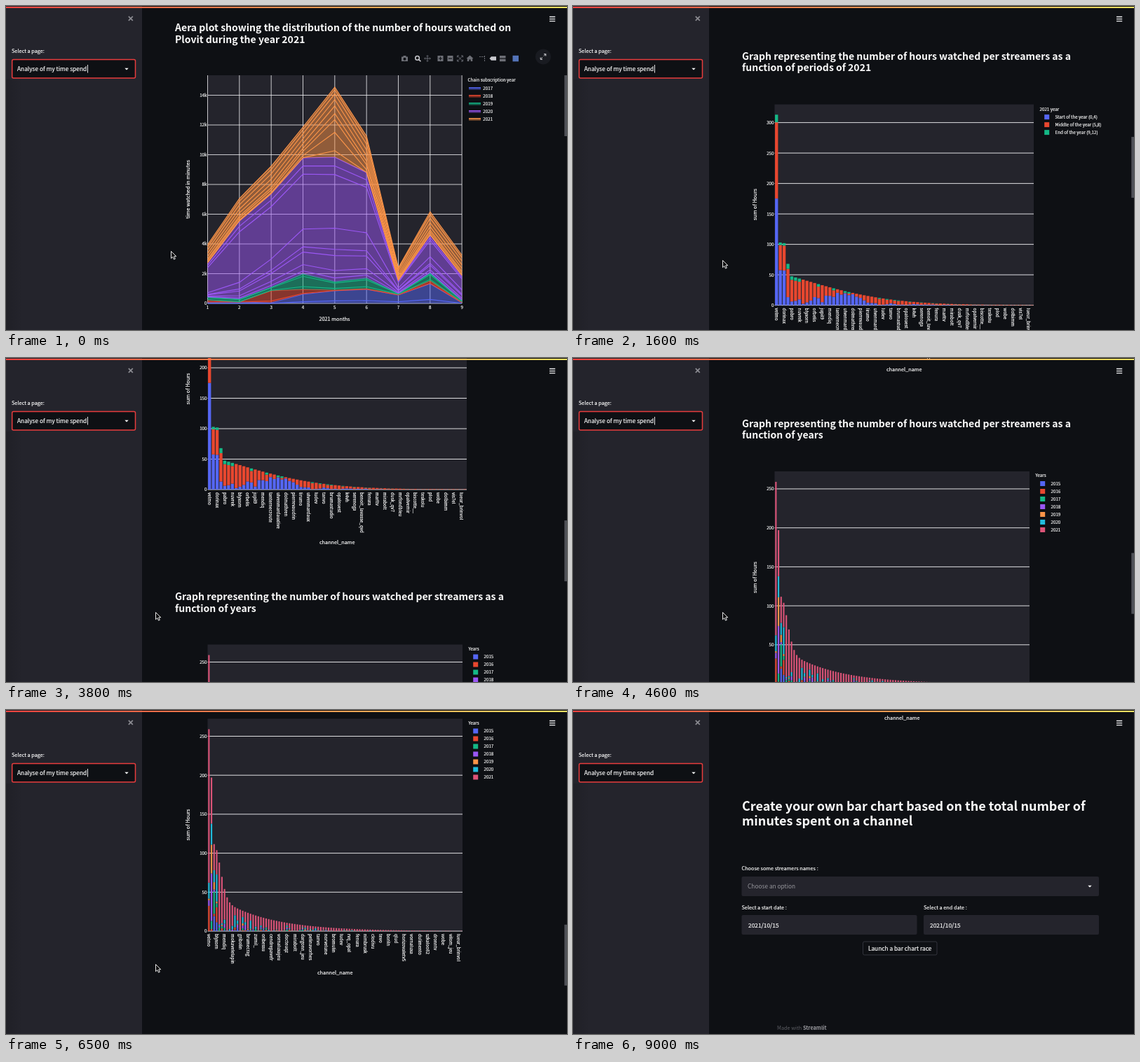
Animation, 800 px wide and 463 px high, one loop 9200 ms. Source, as an HTML page:

```html
<!DOCTYPE html>
<html lang="en">
<head>
<meta charset="utf-8">
<title>Time spent dashboard</title>
<style>
html, body { margin: 0; width: 100%; height: 100%; overflow: hidden; background: #0e1014; }
svg { display: block; width: 800px; height: 463px; font-family: "Noto Sans CJK JP", "Noto Sans CJK SC", "Noto Sans", sans-serif; }
text { fill: #fafafa; stroke: #fafafa; stroke-width: .18px; white-space: pre; }
.mid { text-anchor: middle; }
.end { text-anchor: end; }
.head { font-weight: 600; stroke: none; }
.hint { fill: #96969c; stroke: none; }
.foot { fill: #5d5e64; stroke: none; }
</style>
</head>
<body>
<svg id="stage" viewBox="0 0 800 463"></svg>
<script>
const PANEL = '#24242c', PAGE = '#0e1014';
const BLUE = '#5566f3', RED = '#e8472f', GREEN = '#14b886', PURPLE = '#9b57f5',
      ORANGE = '#fb9448', CYAN = '#20bcdc', PINK = '#dc5478';
const TINY = 6.22, SMALL = 7.3, BODY = 8.36, H3 = 14.02, H2 = 18.03;

const rect = (x, y, w, h, fill, more = '') =>
  `<rect x="${x}" y="${y}" width="${w}" height="${h}" fill="${fill}" ${more}/>`;
const path = (d, color, width = 1, more = '') =>
  `<path d="${d}" fill="none" stroke="${color}" stroke-width="${width}" ${more}/>`;
const text = (x, y, s, size, more = '') =>
  `<text x="${x}" y="${y}" font-size="${size}" ${more}>${s}</text>`;
const turned = (x, y, angle, s, size, more = '') =>
  text(0, 0, s, size, `transform="translate(${x} ${y}) rotate(${angle})" ${more}`);
const heading = (y, lines, size = H3, pitch = 16.5) =>
  lines.map((s, i) => text(241, y + i * pitch, s, size, 'class="head"')).join('');
const caretDown = (x, y) => `<path d="M${x - 2.7} ${y - 1.2}h5.4l-2.7 2.8z" fill="#fafafa"/>`;
const noise = n => { const v = Math.sin(n * 12.9898) * 43758.5453; return v - Math.floor(v); };
const gauss = (x, center, width) => Math.exp(-(((x - center) / width) ** 2));

// Stacked areas: top edge per month in pixels, and inner lines as shares of the band
const bands = [
  { color: BLUE, top: [2, 2, 1, 13, 18, 20, 12, 28, 1], inner: [.2] },
  { color: RED, top: [5, 2, 18, 20, 19, 21, 13, 32, 2], inner: [.2] },
  { color: GREEN, top: [9, 6, 23, 42, 31, 36, 14, 43, 4], inner: [.2, .85] },
  { color: PURPLE, top: [58, 118, 157, 208, 209, 187, 33, 98, 40], inner: [.03, .09, .21, .26, .43, .86, .93] },
  { color: ORANGE, top: [84, 150, 196, 252, 309, 239, 51, 131, 69], inner: [.005, .1, .25, .35, .5, .65, .8, .92] }
];

function innerShare(color, u, m) {
  if (color == ORANGE) return u ** (1.5 - 1.05 * gauss(m, 4, 1));
  return u < .5 ? u * Math.min(1, .3 + .2 * m) : u;
}

function areaChart() {
  const X = m => 287.5 + m * 45.33;
  const points = line => line.map((h, m) => `${X(m)} ${425 - h}`);
  let out = rect(287.5, 99, 362.6, 326, PANEL);
  let grid = '';
  for (let k = 0; k <= 14; k += 2) {
    const y = 425 - k * 21.25;
    grid += `M287.5 ${y}H650`;
    out += text(286.5, y + 2.4, k ? k + 'k' : 0, TINY, 'class="end"');
  }
  for (let m = 0; m < 9; m++) {
    grid += `M${X(m)} 99V425`;
    out += text(X(m), 432.8, m + 1, TINY, 'class="mid"');
  }
  out += path(grid, '#f4f4f6', .8) + text(658.5, 108, 'Chain subscription year', TINY);
  let base = Array(9).fill(0);
  bands.forEach(({ color, top, inner }, i) => {
    out += `<path d="M${points(top).join('L')}L${points(base).reverse().join('L')}z" fill="${color}" fill-opacity=".5"/>`;
    for (const u of [...inner, 1]) {
      const line = top.map((h, m) => base[m] + (h - base[m]) * innerShare(color, u, m));
      out += path('M' + points(line).join('L'), color, 1.15);
    }
    base = top;
    const y = 117.5 + i * 11;
    out += rect(660, y - 1.5, 17, 3.6, color, 'fill-opacity=".5"') + path(`M660 ${y - .7}h17`, color, 1.3)
      + text(680.3, y + 2.4, 2017 + i, TINY);
  });
  return out + turned(262, 262, -90, 'time watched in minutes', SMALL, 'class="mid"')
    + text(468.5, 449.6, '2021 months', SMALL, 'class="mid"');
}

function modebar() {
  const dim = '#6d6f76', lit = '#c9cacf';
  const box = x => rect(x - 4, 71, 8, 8, dim);
  return rect(564, 72.5, 9, 6.5, dim) + rect(566.5, 71, 4, 2, dim) + `<circle cx="568.5" cy="75.7" r="2" fill="${PAGE}"/>`
    + `<circle cx="586.6" cy="74.4" r="2.8" fill="none" stroke="${lit}" stroke-width="1.5"/>` + path('M588.8 76.6l2.6 2.6', lit, 1.6)
    + path('M601 70.8v8.4M596.8 75h8.4M599.6 72l1.4-1.4 1.4 1.4M599.6 78l1.4 1.4 1.4-1.4M598 73.6l-1.4 1.4 1.4 1.4M604 73.6l1.4 1.4-1.4 1.4', dim, .9)
    + box(619.5) + path('M619.5 72.5v5M617 75h5', PAGE, 1.2) + box(633.5) + path('M631 75h5', PAGE, 1.2)
    + path('M643.5 71l8 8M651.5 71l-8 8M643.5 73.5V71h2.5M649 71h2.5v2.5M643.5 76.5V79h2.5M649 79h2.5v-2.5', dim, .9)
    + `<path d="M661.5 70.5l5 4.6h-1.3V79h-2.5v-2.6h-2.4V79h-2.5v-3.9h-1.3z" fill="${dim}"/>`
    + path('M675 72.5h7M682.5 71v8', dim, 1, 'stroke-dasharray="2 1"')
    + `<path d="M689.5 75l2.5-2.7h7v5.4h-7z" fill="${lit}"/>`
    + rect(704, 71, 8.5, 3.5, dim) + rect(704, 75.7, 8.5, 3.5, dim) + rect(722.5, 70.8, 8.5, 8.5, '#5373b8')
    + '<circle cx="766" cy="72.5" r="11" fill="#191b21"/>'
    + path('M767 71.5l2.8-2.8M767 68.7h2.8v2.8M765 73.5l-2.8 2.8M762.2 73.5v2.8h2.8', '#d8d8dc');
}

function barChart(o) {
  const step = o.width / o.count;
  let out = rect(287.5, o.top, o.width, o.zero - o.top, PANEL);
  for (let v = 0; v <= o.max; v += 50) {
    const y = o.zero - v * o.scale;
    out += path(`M287.5 ${y}h${o.width}`, '#f4f4f6', .9) + text(286.5, y + 2.4, v, TINY, 'class="end"');
  }
  for (let i = 0; i < o.count; i++) {
    let y = o.zero;
    o.shares(i).forEach((share, k) => {
      const h = share * o.total(i) * o.scale;
      y -= h;
      out += rect(287.5 + (i + .5) * step - o.bar / 2, y, o.bar, h, o.keys[k][1]);
    });
  }
  o.names.forEach((s, i) => {
    out += turned(287.5 + (i * o.every + .5) * step - 2.2, o.zero + 4, 90, s, TINY);
  });
  out += text(o.legendX, o.legendY + 2.4, o.legend, TINY);
  o.keys.forEach(([label, color], i) => {
    const y = o.legendY + 11.5 + i * 11;
    out += rect(o.legendX + 6.7, y - 3.5, 7, 7, color) + text(o.legendX + 22, y + 2.4, label, TINY);
  });
  return out + turned(262, o.titleY, -90, 'sum of Hours', SMALL, 'class="mid"')
    + text(287.5 + o.width / 2, o.axisY, 'channel_name', SMALL, 'class="mid"');
}

const periodTotal = i => [313, 103, 102, 68][i] || .5 + 47 * Math.exp((4 - i) / 26) * gauss(i, 4, 32);
function periodShares(i) {
  const start = i < 3 ? .56 : .65 * gauss(i, 19, 5) + .35 * noise(i);
  const end = i < 3 ? .04 : noise(i + 90) > .65 ? .12 : 0;
  return [start, Math.max(0, 1 - start - end), end];
}

const yearTotal = i => [259, 197][i] || 34 * Math.exp((8 - i) / 19) + 65 * gauss(i, 2, 3.4);
function yearShares(i) {
  const last = i == 0 ? .76 : i < 4 ? .3 : 1 - .7 * noise(i) ** 2;
  const weights = Array.from({ length: 6 }, (_, k) => noise(i * 7 + k) ** 3 + (k == 5 ? .4 : 0));
  const sum = weights.reduce((a, b) => a + b);
  return [...weights.map(w => w / sum * (1 - last)), last];
}

const names = `velmo dorinax pabro nuvrek blyxorn orbelis jupil9 mendiq lanternecroute ulvenmardauxlive
  dolmathren pierrevaudrin lirumo ulvenmardaux ludev tanvo brumastudio opalouest k4vh serenoga benoit_lavasse_qvd
  fenura marltv mirabolt dusk_qv7 mrfondbleu opalvernir biscotte__ teskolu plod wobe dolbimm vis7el lueur_brinvol`.split(/\s+/);
const yearNames = `velmo blyxorn mendiq mokavelelapin gribolin brumecrag zurnil_ oribessu cendrepavefr vornaluxajeu
  docteuqz mirabolt dargonn_jeu pelinavorhes tanvo norvelune bromulin ludev rvq_opal fenura nimbrusk clodivu tevo
  boriln qlud horizovaletv5 vornaluxa dulimento szkaloo82 dronntv wobe vilom_jeu lueur_brinvol`.split(/\s+/);

function form() {
  const field = (x, y, w) => rect(x, y, w, 28, PANEL, 'rx="2"');
  return heading(143.5, ['Create your own bar chart based on the total number of', 'minutes spent on a channel'], H2, 21)
    + text(240.5, 229, 'Choose some streamers names :', SMALL) + field(240.5, 238, 509.5)
    + text(249, 255.3, 'Choose an option', BODY, 'class="hint"') + caretDown(737, 252)
    + text(240.5, 284.5, 'Select a start date :', SMALL) + text(500, 284.5, 'Select a end date :', SMALL)
    + field(240.5, 293, 250) + field(500, 293, 250)
    + text(250, 310.5, '2021/10/15', BODY) + text(509, 310.5, '2021/10/15', BODY)
    + rect(413.5, 331, 105.5, 19, PAGE, 'rx="2" stroke="#3d3e47" stroke-width=".8"')
    + text(466.2, 343.7, 'Launch a bar chart race', BODY, 'class="mid"')
    + text(291, 456.5, 'Made with <tspan font-weight="600" fill="#9b9ba0">Streamlit</tspan>', SMALL, 'class="foot"');
}

const page = heading(36, ['Aera plot showing the distribution of the number of hours watched on', 'Plovit during the year 2021'])
  + `<g id="tools">${modebar()}</g>` + areaChart()
  + heading(545.3, ['Graph representing the number of hours watched per streamers as a', 'function of periods of 2021'])
  + barChart({ count: 68, width: 369.5, bar: 4.35, top: 609, zero: 896, scale: .87, max: 300,
      total: periodTotal, shares: periodShares, names, every: 2,
      legendX: 665.5, legendY: 615.5, legend: '2021 year', titleY: 752, axisY: 974,
      keys: [['Start of the year (0,4)', BLUE], ['Middle of the year (5,8)', RED], ['End of the year (9,12)', GREEN]] })
  + heading(1054, ['Graph representing the number of hours watched per streamers as a', 'function of years'])
  + barChart({ count: 98, width: 363.5, bar: 2.1, top: 1117.5, zero: 1421, scale: 1.114, max: 250,
      total: yearTotal, shares: yearShares, names: yearNames, every: 3,
      legendX: 659.5, legendY: 1123.5, legend: 'Years', titleY: 1269, axisY: 1482.5,
      keys: [BLUE, RED, GREEN, PURPLE, ORANGE, CYAN, PINK].map((c, i) => [2015 + i, c]) })
  + `<g transform="translate(0 1468.5)">${form()}</g>`;

const sidebar = rect(0, 0, 194, 463, PANEL) + rect(0, 105, 24, 358, 'url(#shade)')
  + path('M174.8 14.8l6 6M180.8 14.8l-6 6', '#8b8b91', 1.7)
  + text(8, 67.3, 'Select a page:', SMALL)
  + rect(8.7, 76.5, 175.8, 26.6, PAGE, 'rx="2" stroke="#e73c3d" stroke-width="1.5"')
  + text(16, 93, 'Analyse of my time spend', BODY) + caretDown(172, 90)
  + rect(116, 84, .9, 11.5, '#fafafa', 'id="caret"');

document.getElementById('stage').innerHTML = `<defs>
  <linearGradient id="shade"><stop stop-color="#000" stop-opacity=".12"/><stop offset="1" stop-color="#000" stop-opacity="0"/></linearGradient>
  <linearGradient id="strip"><stop stop-color="#f8433f"/><stop offset="1" stop-color="#f6e463"/></linearGradient></defs>
  ${rect(0, 0, 800, 463, PAGE)}<g id="page">${page}</g>${sidebar}
  ${path('M775 15.5h8.2M775 18.6h8.2M775 21.7h8.2', '#f0f0f2', 1.3)}
  ${rect(0, 1, 800, 2, 'url(#strip)')}${rect(796.3, 0, 3.7, 87, '#505258', 'id="thumb"')}
  <path id="mouse" d="M0 0V10.2L2.4 8 4 11.6 5.8 10.8 4.2 7.3H7.3z" fill="#0a0a0c" stroke="#fff" stroke-width=".9"/>`;

const [pageEl, tools, caret, thumb, mouse] =
  ['page', 'tools', 'caret', 'thumb', 'mouse'].map(id => document.getElementById(id));
const ramp = (t, a, b) => Math.min(1, Math.max(0, (t - a) / (b - a)));
const ease = (t, a, b) => { const u = ramp(t, a, b); return u * u * (3 - 2 * u); };

function draw(ms) {
  const t = Math.floor(ms % 9200 / 100) * 100;
  const scroll = 489 * ease(t, 800, 1713) + 466.5 * ease(t, 3400, 4234)
    + 149.5 * ease(t, 5500, 6200) + 363.5 * ease(t, 8300, 8800);
  const move = ease(t, 0, 800);
  pageEl.setAttribute('transform', `translate(0 ${-scroll})`);
  tools.setAttribute('opacity', 1 - ramp(t, 0, 300));
  caret.setAttribute('opacity', t < 100 || t % 1000 >= 500 ? 1 : 0);
  thumb.setAttribute('y', 99 + scroll * .188);
  thumb.setAttribute('opacity', t < 8400 ? 1 - ramp(t, 7100, 7500) : 1 - ramp(t, 8700, 9000));
  mouse.setAttribute('transform', `translate(${235.5 - 22 * move} ${350.5 + 13 * move})`);
  mouse.setAttribute('opacity', t < 8500 ? 1 : 0);
}

const begin = performance.now();
function tick() {
  draw(performance.now() - begin);
  requestAnimationFrame(tick);
}
tick();
</script>
</body>
</html>
```
